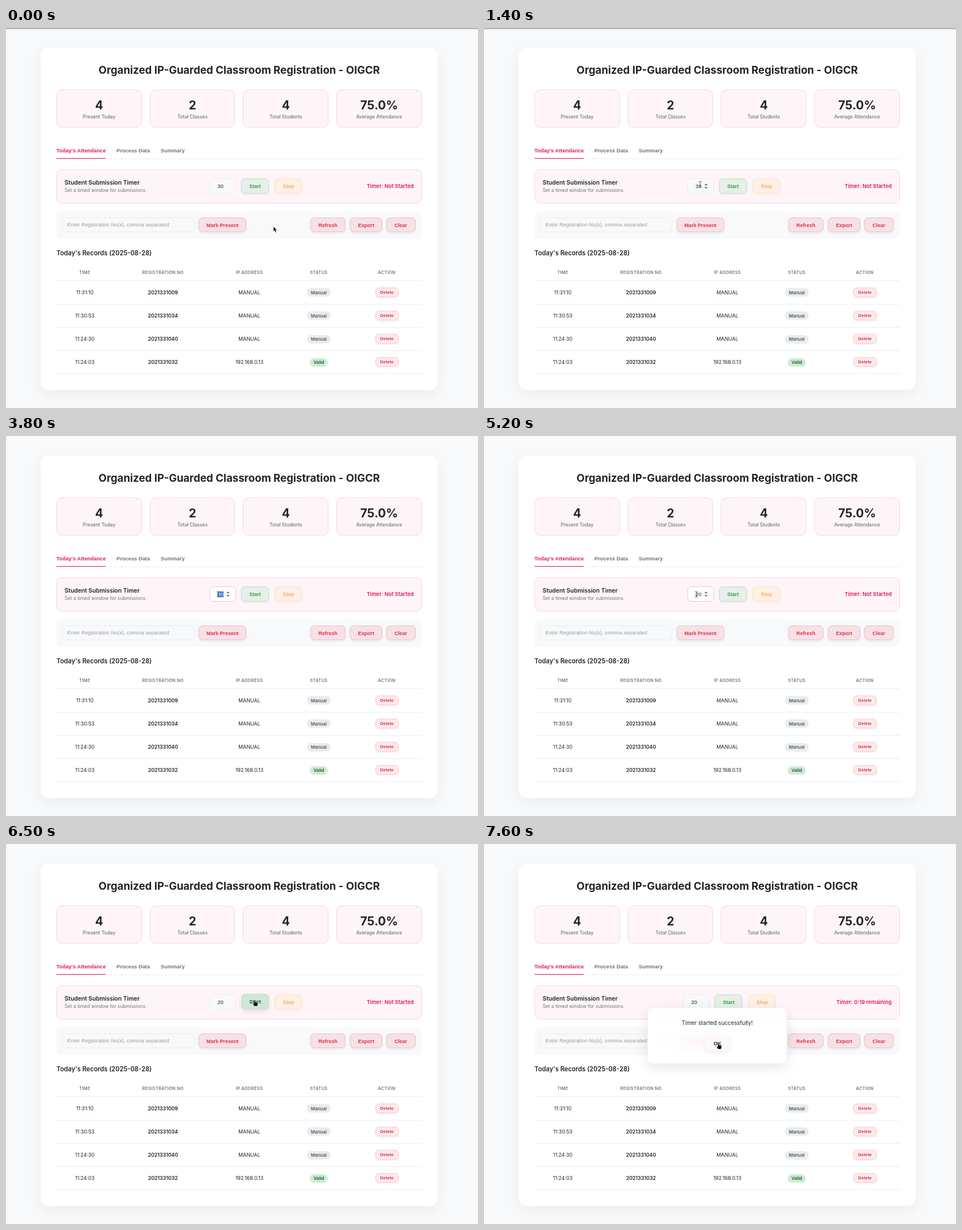
Write an HTML page that moves like this. It is 833 by 672 pixels and loops after 8 s.

```html
<!DOCTYPE html>
<html lang="en">
<head>
<meta charset="utf-8">
<title>Attendance</title>
<style>
  html, body { margin: 0; width: 100%; height: 100%; overflow: hidden; background: #f8f9fb; }
  #stage { position: absolute; left: 0; top: 0; width: 833px; height: 672px; overflow: hidden; }
  #stage div { position: absolute; box-sizing: border-box; }
  .t { white-space: pre; line-height: 20px; height: 20px; }
  .inter { font-family: Inter, sans-serif; }
  .sans { font-family: "Liberation Sans", Arial, sans-serif; }
  .panel { background: #fff; border-radius: 14px; box-shadow: 0 8px 24px rgba(0, 0, 0, .05); }
  .card { background: #fff5f8; border: 1px solid #f9d2de; border-radius: 10px; }
  .field { background: #f8f9fa; border: 1px solid #e9ecef; border-radius: 7px; }
  .focus { background: #fff; border-color: #f5bfd0; }
  .btn { border: 1px solid; border-radius: 7px; box-shadow: 0 2px 4px rgba(0, 0, 0, .06); }
  .red { background: #f6e1e6; border-color: #f4bec8; }
  .go { border-color: #bfe2c8; }
  .wait { background: #fdf0e4; border-color: #fde4cb; box-shadow: 0 2px 4px rgba(0, 0, 0, .03); }
  .del { background: #fdeaed; border-color: #f6c9d0; border-radius: 6px; }
  .ok { background: #fff8fa; border: 0; box-shadow: 0 2px 6px rgba(0, 0, 0, .07); }
  .dialog { background: rgba(255, 255, 255, .87); backdrop-filter: blur(7px); border-radius: 9px;
            box-shadow: 0 7px 24px rgba(0, 0, 0, .1); }
  .edge { background: linear-gradient(#858688, #d9dadc 60%, #f8f9fb); }
  svg { position: absolute; left: 0; top: 0; }
</style>
</head>
<body>
<div id="stage"></div>
<script>
const stage = document.getElementById('stage');
const INK = '#212529', MUTED = '#6c757d', PINK = '#e0195d', RED = '#dc3545', LINE = '#e9ecef';

function box(x, y, w, h, cls = '', parent = stage) {
  const el = document.createElement('div');
  el.className = cls;
  el.style.cssText = `left:${x}px;top:${y}px;width:${w}px;height:${h}px`;
  parent.appendChild(el);
  return el;
}

// Text is anchored at x and centred vertically on cy.
function text(str, x, cy, size, weight, color, align = 'left', font = 'inter', parent = stage) {
  const shift = { left: 0, center: 300, right: 600 }[align];
  const el = box(x - shift, cy - 10, 600, 20, 't ' + font, parent);
  el.style.fontSize = size + 'px';
  el.style.fontWeight = weight;
  el.style.color = color;
  el.style.textAlign = align;
  el.textContent = str;
  return el;
}

function button(label, x, y, w, h, cls, color, size = 9, parent = stage) {
  const face = box(x, y, w, h, 'btn ' + cls, parent);
  const name = text(label, x + w / 2, y + h / 2 + .5, size, 700, color, 'center', 'sans', parent);
  return { face, name };
}

function rule(y, color = LINE) {
  box(89, y, 645, 1).style.background = color;
}

// Page
box(61, 35, 701, 605, 'panel');
text('Organized IP-Guarded Classroom Registration - OIGCR', 411.5, 74.5, 18.67, 700, INK, 'center');

[['4', 'Present Today'], ['2', 'Total Classes'], ['4', 'Total Students'], ['75.0%', 'Average Attendance']]
  .forEach(([value, label], i) => {
    const x = 88.9 + i * 164.75;
    box(x, 109, 150.75, 67, 'card');
    text(value, x + 75.4, 136.5, 21, 700, INK, 'center');
    text(label, x + 75.4, 156.5, 8.4, 500, MUTED, 'center');
  });

rule(231, '#eceff2');
[["Today's Attendance", 89], ['Process Data', 195], ['Summary', 273]].forEach(([label, x], i) =>
  text(label, x, 217.2, 9.33, 700, i ? MUTED : PINK, 'left', 'sans'));
box(89, 229.7, 87, 1.5).style.background = PINK;

// Timer
box(89, 250, 645, 60, 'card');
text('Student Submission Timer', 103.5, 274.2, 10.4, 600, INK);
text('Set a timed window for submissions.', 103.5, 287, 8.4, 400, MUTED);
const status = text('', 719.5, 280, 9.33, 600, PINK, 'right');

const group = box(0, 0, 0, 0);
const minutes = box(359, 266, 47, 27, 'field', group);
const typed = document.createElement('span');
text('', 373.3, 280.1, 9.33, 400, INK, 'left', 'sans', group).appendChild(typed);
const spinner = box(388, 274, 8, 12, '', group);
spinner.innerHTML = '<svg width="8" height="12"><path d="M1 4.2L3.8 1l2.8 3.2zM1 7.3h5.6L3.8 10.5z" fill="#6b6f73"/></svg>';
const start = box(0, 0, 0, 0, '', group);
const startBtn = button('Start', 415, 266, 49, 27, 'go', '', 9, start);
button('Stop', 474, 266, 49, 27, 'wait', '#f2b061', 9, group);

// Controls
const bar = box(89, 323.5, 645, 49.5);
bar.style.cssText += ';background:#f8f9fa;border-radius:9px';
box(98, 335, 234, 26, 'field');
text('Enter Registration No(s), comma separated', 108, 348, 9.33, 400, '#9a9da1', 'left', 'sans');
[['Mark Present', 340, 84], ['Refresh', 537, 62], ['Export', 607, 57], ['Clear', 671, 51.5]]
  .forEach(([label, x, w]) => button(label, x, 335, w, 26, 'red', RED));

// Records
text("Today's Records (2025-08-28)", 89, 398, 11.2, 600, INK);
const cols = [139, 277, 429.5, 552, 672];
['TIME', 'REGISTRATION NO', 'IP ADDRESS', 'STATUS', 'ACTION'].forEach((label, i) => {
  text(label, cols[i], 433, 7.47, 600, MUTED, 'center').style.letterSpacing = '.33px';
});
rule(446);
[['11:31:10', '2021331009', 'MANUAL'], ['11:30:53', '2021331034', 'MANUAL'],
 ['11:24:30', '2021331040', 'MANUAL'], ['11:24:03', '2021331032', '192.168.0.13']]
  .forEach((cells, row) => {
    const cy = 467.7 + row * 41.17;
    cells.forEach((cell, i) => text(cell, cols[i], cy, 8.87, i === 1 ? 600 : 400, INK, 'center'));
    const manual = cells[2] === 'MANUAL', w = manual ? 42 : 32;
    const badge = box(552 - w / 2, cy - 7.5, w, 15);
    badge.style.borderRadius = '8px';
    badge.style.background = manual ? LINE : '#d0ecd8';
    text(manual ? 'Manual' : 'Valid', 552, cy, 7.93, 600, manual ? '#545b62' : '#1c5c2e', 'center');
    button('Delete', 651.5, cy - 9, 41.5, 17, 'del', RED, 8);
    rule(Math.round(cy + 19.8));
  });

const edge = box(0, 0, 833, 2.5, 'edge');

// Dialog
const dialog = box(289, 290, 245, 98, 'dialog');
text('Timer started successfully!', 122.5, 26.5, 9.8, 400, INK, 'center', 'inter', dialog);
button('OK', 101, 49, 44, 27, 'ok', INK, 9, dialog);

// Cursors, each with its hot spot at the origin
const bars = 'M-2.3-5Q0-5 0-3.6Q0-5 2.3-5M0-4V4M-2.3 5Q0 5 0 3.6Q0 5 2.3 5M-1.2 1H1.2';
stage.insertAdjacentHTML('beforeend', `<svg width="833" height="672">
  <g id="arrow"><path d="M0 0V9.2L2.1 7.3 3.6 10.9 5.2 10.2 3.7 6.7H6.4Z" fill="#000" stroke="#fff" stroke-width=".6"/></g>
  <g id="beam" fill="none"><path d="${bars}" stroke="#fff" stroke-width="1.8" opacity=".5"/>
    <path d="${bars}" stroke="#333" stroke-width=".8"/></g>
  <g id="hand"><path d="M-1 .8Q0-.6 1 .8V3.6L5 4.4Q6 4.7 5.8 6L5 10.8H-.4L-3.3 6.6Q-2.9 5.2-1 6.6Z" fill="#000" stroke="#fff" stroke-width=".5"/></g>
</svg>`);
const cursors = ['arrow', 'beam', 'hand'].map(id => document.getElementById(id));

// Motion: [time, values...], linear between keys
const path = [[200, 472, 351], [500, 459, 335], [800, 429, 301], [1100, 408, 278], [1200, 396, 277],
  [1400, 381.7, 276.5], [1700, 381.7, 276.5], [1800, 380, 276.5], [2300, 380, 276.5], [2400, 365, 286],
  [2500, 356, 292], [2600, 377, 280], [2700, 377, 280], [3000, 375.5, 280], [3600, 375.5, 280],
  [3800, 374.7, 280], [5200, 374.7, 280], [5400, 390, 289], [5700, 425, 308], [6000, 447, 313],
  [6300, 440, 277], [6400, 438.7, 276], [6800, 438.7, 276], [7300, 413.5, 352]];
const hoverKeys = [[1100, 0], [1200, .35], [1300, .2], [1400, 0], [6100, 0], [6400, 1], [6900, 1], [7200, 0]];

function at(keys, t) {
  const i = keys.findIndex(k => k[0] > t);
  if (i < 0) return keys[keys.length - 1].slice(1);
  if (i === 0) return keys[0].slice(1);
  const a = keys[i - 1], b = keys[i], p = (t - a[0]) / (b[0] - a[0]);
  return a.slice(1).map((v, n) => v + (b[n + 1] - v) * p);
}

const within = (t, ...spans) => spans.some(([a, b]) => t >= a && t < b);
const mix = (a, b, p) => `rgb(${a.map((v, i) => Math.round(v + (b[i] - v) * p))})`;

function draw(t) {
  const [x, y] = at(path, t), [hover] = at(hoverKeys, t);
  const shape = within(t, [1200, 5400]) ? 1 : within(t, [6200, 7000], [7400, 8000]) ? 2 : 0;
  cursors.forEach((c, i) => {
    c.style.display = i === shape ? '' : 'none';
    c.setAttribute('transform', `translate(${x} ${y})`);
  });

  startBtn.face.style.background = mix([230, 239, 232], [207, 231, 214], hover);
  startBtn.face.style.boxShadow = `0 ${2 + hover * 2}px ${4 + hover * 4}px rgba(0,0,0,${.06 + hover * .04})`;
  startBtn.name.style.color = mix([40, 167, 69], [21, 97, 46], hover);
  start.style.top = -hover + 'px';

  const running = t >= 6600;
  group.style.left = (running ? (t < 7500 ? -8.3 : -7.6) : 0) + 'px';
  status.textContent = running ? `Timer: 0:${t < 7500 ? 20 : 19} remaining` : 'Timer: Not Started';
  dialog.style.display = running ? '' : 'none';

  const selected = within(t, [2500, 2800], [3400, 4300]);
  const caret = within(t, [1800, 2500], [2800, 3400], [4300, 5200], [5700, 6200]);
  typed.textContent = t >= 4600 ? '20' : t >= 4300 ? '2' : within(t, [3200, 3400]) ? '3' : '30';
  typed.style.background = selected ? '#2f6fe4' : 'none';
  typed.style.color = selected ? '#fff' : INK;
  typed.style.boxShadow = caret ? '.8px 0 0 ' + INK : 'none';
  minutes.classList.toggle('focus', within(t, [1800, 6400]));
  spinner.style.display = within(t, [1200, 6400]) ? '' : 'none';
  edge.style.opacity = t < 1800 ? 1 : t < 1900 ? .5 : 0;
}

const STEP = 100, LOOP = 8000;
let begin = null;
function tick(now) {
  if (begin === null) begin = now;
  draw(Math.floor((now - begin) % LOOP / STEP) * STEP);
  requestAnimationFrame(tick);
}
draw(0);
requestAnimationFrame(tick);
</script>
</body>
</html>
```
